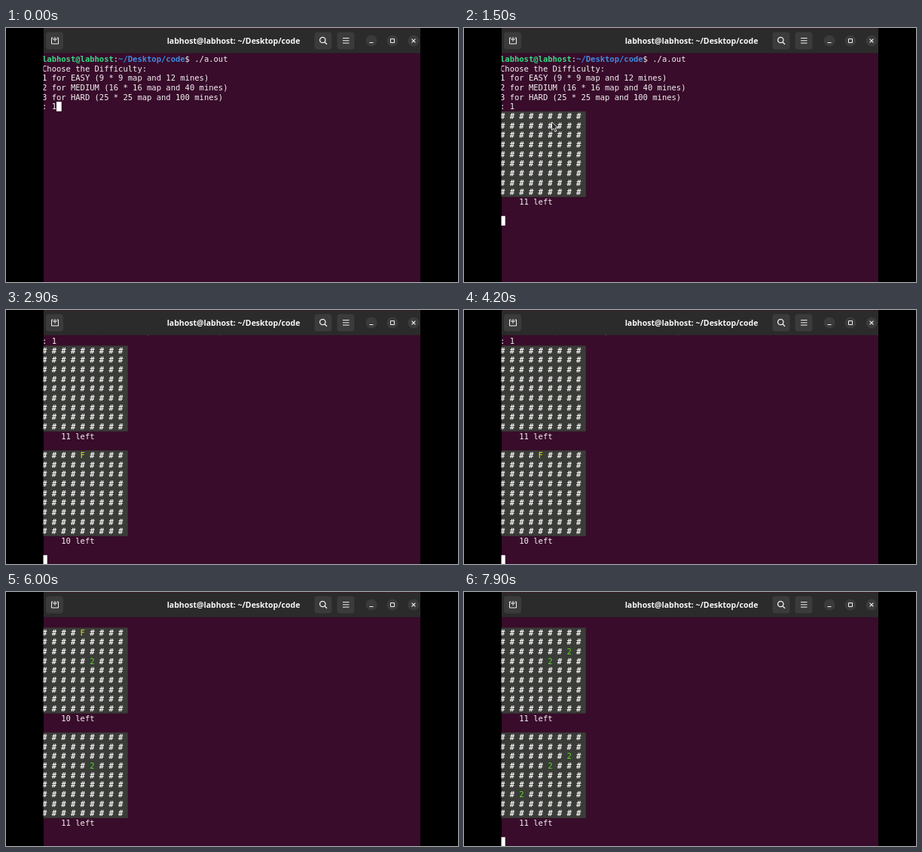
Recreate the animation shown at these times as an HTML page with a canvas. Size 600 by 338 pixels, loop 8000 ms.

```html
<!DOCTYPE html>
<html lang="en">
<head>
<meta charset="utf-8">
<title>Terminal minesweeper</title>
<style>
html, body { margin: 0; width: 100%; height: 100%; overflow: hidden; background: #000; }
canvas { display: block; }
</style>
</head>
<body>
<canvas id="stage" width="600" height="338"></canvas>
<script>
const ctx = document.getElementById('stage').getContext('2d');
const LOOP = 8000, ROWS = 24;
const LEFT = 48, TOP = 34.8, CELL = 6.32, LINE = 12.67;
const MONO = '10.5px "DejaVu Sans Mono", monospace';
const WHITE = '#f4f1f3', GREEN = '#35d983', BLUE = '#3f8be0', BOARD = '#3a3c38';
const MARK_COLORS = { F: '#e6e61e', 2: '#5ad82a' };

const USER = 'labhost@labhost';
const INTRO = [
  '',
  'Choose the Difficulty:',
  '1 for EASY (9 * 9 map and 12 mines)',
  '2 for MEDIUM (16 * 16 map and 40 mines)',
  '3 for HARD (25 * 25 map and 100 mines)',
  ': 1'
];

// Each mark is [column, row, character].
const flag = [4, 0, 'F'], a = [5, 3, '2'], b = [7, 2, '2'], c = [2, 6, '2'];
const BOARDS = [
  { at: 300, left: 11, marks: [] },
  { at: 2800, left: 10, marks: [flag] },
  { at: 4300, left: 10, marks: [flag, a] },
  { at: 5300, left: 11, marks: [a] },
  { at: 6400, left: 11, marks: [a, b] },
  { at: 7500, left: 11, marks: [a, b, c] }
];

// Times at which the block cursor toggles, starting visible.
const BLINKS = [900, 1500, 3500, 4100, 4800, 5300, 5900, 6500, 7100, 7600];

// Mouse pointer sightings: [from, to, x, y].
const POINTER = [
  [1400, 1700, 116.5, 125],
  [2100, 2300, 131.5, 178],
  [2500, 2600, 107.5, 194.5],
  [3700, 3900, 125.5, 241.5],
  [6700, 6800, 86, 276],
  [7300, 7500, 79.5, 269]
];

function box(x, y, w, h, color) {
  ctx.fillStyle = color;
  ctx.fillRect(x, y, w, h);
}

function type(text, col, row, color, bold) {
  ctx.font = (bold ? 'bold ' : '') + MONO;
  ctx.fillStyle = color;
  [...text].forEach((ch, i) =>
    ctx.fillText(ch, LEFT + (col + i) * CELL, TOP + row * LINE + 10.2));
}

function stroke(path, width = 1) {
  ctx.lineWidth = width;
  ctx.strokeStyle = '#f2f2f2';
  ctx.stroke(new Path2D(path));
}

function button(x, y, w, h, r) {
  ctx.fillStyle = '#3b3b3b';
  ctx.beginPath();
  ctx.roundRect(x, y, w, h, r);
  ctx.fill();
}

function drawHeader() {
  box(50, 0, 500, 33.5, '#2b2b2b');
  box(50, 0, 500, 1, '#3a1a2a');
  for (const x of [53, 409.5, 439.5]) button(x, 5.5, 23, 23, 4);
  for (const x of [485, 513, 541]) button(x - 7.5, 9.5, 15, 15, 7.5);
  stroke('M62.5 13H60.5V21H69.5V13H67.5M65 12V18M62 15H68');
  stroke('M424 16a3.7 3.7 0 1 1-7.4 0a3.7 3.7 0 1 1 7.4 0M423 18.7L426 21.7', 1.3);
  stroke('M447 13.5H455.5M447 16.8H455.5M447 20.1H455.5');
  stroke('M482.5 19.5H487.5M510.5 14.5H515.5V19.5H510.5Z');
  stroke('M538.6 14.6L543.4 19.4M543.4 14.6L538.6 19.4', 1.2);
  ctx.font = 'bold 10.5px "Open Sans", sans-serif';
  ctx.fillStyle = '#fafafa';
  ctx.textAlign = 'center';
  ctx.fillText(USER + ': ~/Desktop/code', 302, 20.5);
  ctx.textAlign = 'left';
}

function drawPrompt(row) {
  type(USER, 0, row, GREEN, true);
  type(':', 15, row, WHITE);
  type('~/Desktop/code', 16, row, BLUE, true);
  type('$ ./a.out', 30, row, WHITE);
}

function drawBoard({ left, marks }, row) {
  box(LEFT, TOP + row * LINE, 18 * CELL, 9 * LINE, BOARD);
  for (let y = 0; y < 9; y++) {
    for (let x = 0; x < 9; x++) {
      const mark = marks.find(m => m[0] === x && m[1] === y);
      if (mark) type(mark[2], x * 2, row + y, MARK_COLORS[mark[2]]);
      else type('#', x * 2, row + y, WHITE, true);
    }
  }
  type(left + ' left', 4, row + 9, WHITE);
}

function drawPointer(x, y) {
  ctx.save();
  ctx.translate(x, y);
  const arrow = new Path2D('M0 0V11L2.6 8.7L4.5 13L6.4 12.1L4.5 8H8Z');
  ctx.fillStyle = '#2b2b2b';
  ctx.fill(arrow);
  stroke('M0 0V11L2.6 8.7L4.5 13L6.4 12.1L4.5 8H8Z', 0.9);
  ctx.restore();
}

function draw(t) {
  box(0, 0, 600, 338, '#000');
  box(50, 33, 500, 305, '#380c2a');

  const shown = BOARDS.filter(board => t >= board.at);
  const end = shown.length ? INTRO.length + shown.length * 11 : INTRO.length - 1;
  const scroll = Math.max(0, end - ROWS + 1);

  ctx.save();
  ctx.beginPath();
  ctx.rect(49.5, 33.5, 500.5, 304.5);
  ctx.clip();
  drawPrompt(-scroll);
  INTRO.forEach((text, i) => type(text, 0, i - scroll, WHITE));
  shown.forEach((board, i) => drawBoard(board, INTRO.length + i * 11 - scroll));
  if (BLINKS.filter(at => t >= at).length % 2 === 0) {
    box(LEFT + (shown.length ? 0 : 3 * CELL), TOP + (end - scroll) * LINE, CELL + 0.4, LINE, '#fff');
  }
  ctx.restore();

  drawHeader();
  const seen = POINTER.find(([from, to]) => t >= from && t < to);
  if (seen) drawPointer(seen[2], seen[3]);
}

const start = performance.now();
function tick() {
  draw((performance.now() - start) % LOOP);
  requestAnimationFrame(tick);
}
tick();
</script>
</body>
</html>
```
